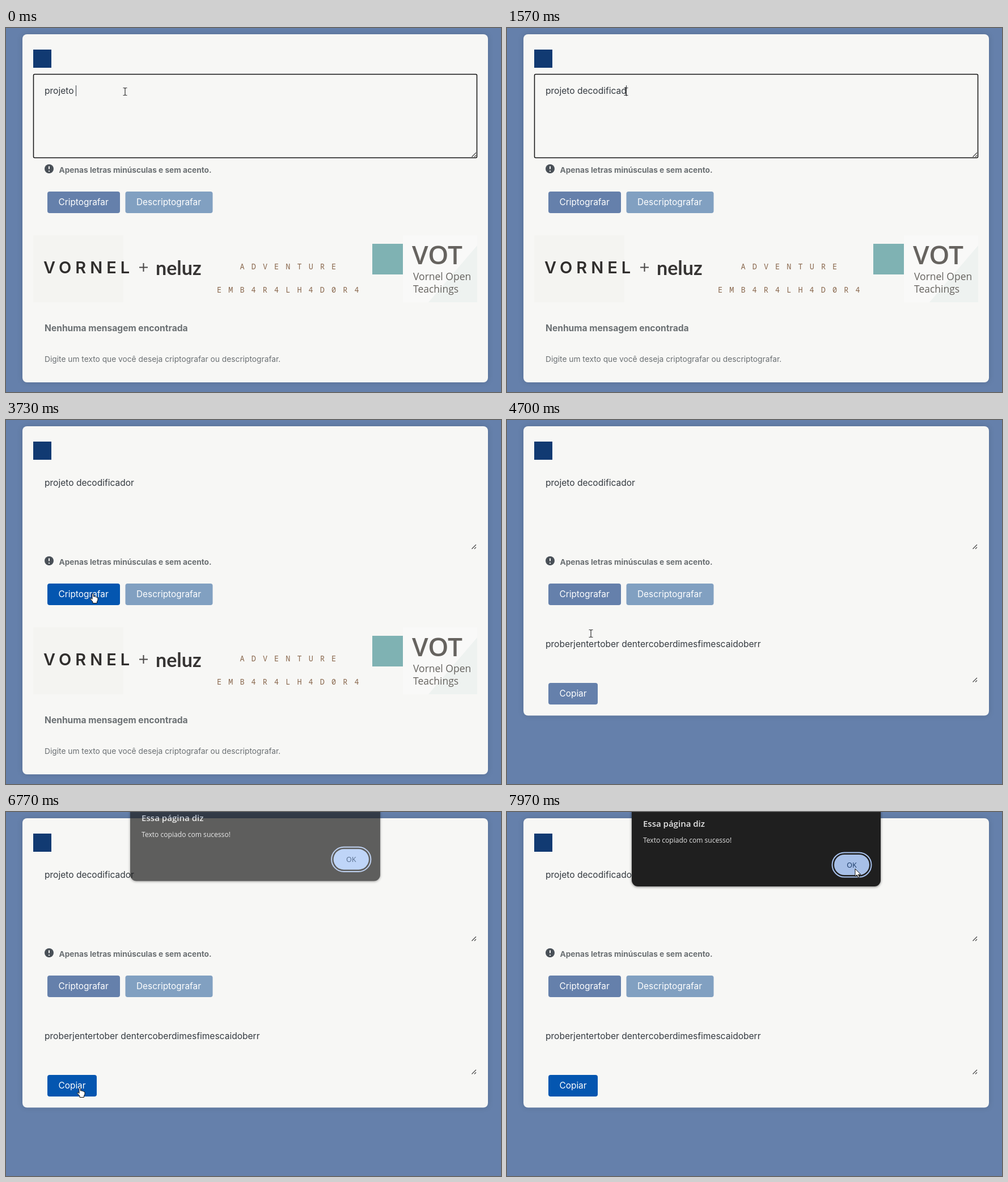
These frames come from a looping animation (873x641 px, 8 s). An HTML page:

```html
<!DOCTYPE html>
<html lang="pt-BR">
<head>
<meta charset="utf-8">
<style>
  html, body { margin: 0; width: 100%; height: 100%; overflow: hidden; background: #6580ab; }
  svg { display: block; width: 873px; height: 641px; font-family: Inter, sans-serif; }
  text { white-space: pre; }
  .field { font-size: 15.55px; fill: #343a40; }
  .strong { font-weight: 700; fill: #6b7073; }
  .button text { font-size: 15.4px; fill: #fff; }
  .code { font: 13.5px "Noto Sans Mono", monospace; letter-spacing: 12.1px; fill: #8b6a50; }
  .program { font-family: "Open Sans", sans-serif; fill: #66635f; }
  .dialog { font-family: "Open Sans", sans-serif; }
  .grip { stroke: #4b4b4b; stroke-width: 1.2; fill: none; }
  #card { filter: drop-shadow(0 0 5px rgba(0, 0, 0, .14)); }
  #dialog { filter: drop-shadow(0 1px 2px rgba(0, 0, 0, .5)); transform-origin: 440px 131px; }
</style>
</head>
<body>
<svg viewBox="0 0 873 641">
  <rect width="873" height="641" fill="#6580ab"/>
  <rect id="card" x="29" y="11" width="821" height="613" rx="8" fill="#f7f7f5"/>
  <rect x="48" y="38" width="32" height="32" fill="#113a72"/>

  <rect id="focus" x="48.5" y="81.5" width="782" height="147" rx="2" fill="none" stroke="#101010" stroke-width="1.5"/>
  <path class="grip" d="M821.5 227l7.5-7.5M826 227l3-3"/>
  <text id="input" class="field" x="68" y="116"></text>
  <rect id="caret" y="101" width="1" height="19" fill="#343a40"/>

  <circle cx="76" cy="248" r="8" fill="#495057"/>
  <path d="M76 243.5v5M76 251.2v1.8" stroke="#f8f8f8" stroke-width="2"/>
  <text class="strong" x="93.5" y="255" font-size="13.7">Apenas letras minúsculas e sem acento.</text>

  <g class="button">
    <rect id="encrypt" x="73" y="288" width="128" height="38" rx="4"/>
    <text x="92.5" y="312">Criptografar</text>
    <rect x="210.5" y="288" width="154" height="38" rx="4" fill="#81a0c1"/>
    <text x="230" y="312">Descriptografar</text>
  </g>

  <g id="empty">
    <rect x="48" y="365" width="159" height="118" fill="#f4f4f1"/>
    <rect x="700" y="365" width="131" height="118" fill="#f9f9f8"/>
    <path d="M745 483L831 383V483Z" fill="#eef2f0"/>
    <text x="66" y="432" font-size="29" font-weight="600" letter-spacing="7" fill="#302e2d">VORNEL</text>
    <path d="M235 421.5h15M242.5 414v15" stroke="#494746" stroke-width="2"/>
    <text x="264" y="435" font-size="34" font-weight="700" fill="#363433" font-family="Lato, sans-serif">neluz</text>
    <text class="code" x="412.5" y="425">ADVENTURE</text>
    <text class="code" x="372" y="466">EMB4R4LH4D0R4</text>
    <rect x="646" y="380" width="54" height="54" fill="#7fb2b3"/>
    <g class="program">
      <text x="716" y="416" font-size="46" font-weight="600">VOT</text>
      <text x="718" y="444" font-size="17.5">Vornel Open</text>
      <text x="718" y="466" font-size="17.5">Teachings</text>
    </g>
    <text class="strong" x="68" y="534" font-size="15.6">Nenhuma mensagem encontrada</text>
    <text x="68" y="588" font-size="13.75" fill="#6b7073">Digite um texto que você deseja criptografar ou descriptografar.</text>
  </g>

  <g id="result">
    <text class="field" x="68" y="400">proberjentertober dentercoberdimesfimescaidoberr</text>
    <path class="grip" d="M821.5 461.5l7.5-7.5M826 461.5l3-3"/>
    <g class="button">
      <rect id="copy" x="73" y="463" width="87" height="38" rx="4"/>
      <text x="92.5" y="487">Copiar</text>
    </g>
  </g>

  <g id="dialog" class="dialog">
    <rect x="220" y="-60" width="439" height="191" rx="11" fill="#1f1f1f"/>
    <text x="240" y="26" font-size="15" font-weight="600" fill="#e6e6e6">Essa página diz</text>
    <text x="240" y="54" font-size="12.05" fill="#e3e3e3">Texto copiado com sucesso!</text>
    <rect x="573.5" y="71.5" width="69" height="43" rx="21.5" fill="none" stroke="#a8c2ee" stroke-width="2"/>
    <rect id="ok" x="577" y="75" width="62" height="36" rx="18"/>
    <text x="608" y="97.5" font-size="12.5" text-anchor="middle" fill="#173765">OK</text>
  </g>

  <g id="pointer">
    <path id="beam" d="M-3.5-6.5H-1L0-5.5L1-6.5H3.5M0-5.5V5.5M-3.5 6.5H-1L0 5.5L1 6.5H3.5" fill="none" stroke="#333" stroke-width="1.2"/>
    <path id="hand" d="M-1 1.5Q0-.5 1.5 1.5V6Q3.5 5 4.3 6.5Q6 5.7 6.8 7.3Q9 6.7 9 9V12L7.5 15V17.5H0V15L-4 10.5Q-4.5 8.5-2.8 8.8L-1 10.5Z" fill="#fff" stroke="#111" stroke-linejoin="round"/>
    <path id="arrow" d="M0 0V13.5L3.2 10.7L5.4 15.5L7.5 14.5L5.4 10H9.8Z" fill="#fff" stroke="#111" stroke-linejoin="round"/>
  </g>
</svg>
<script>
const LOOP = 8000;
const MESSAGE = "projeto decodificador";
const TYPED_AT_START = 8, KEY_INTERVAL = 140;
const TYPING_END = (MESSAGE.length - TYPED_AT_START) * KEY_INTERVAL;
const MOUSE_DOWN = 3640, ENCRYPTED = 3810, DIALOG_OPEN = 6630, DIALOG_FADE = 200, LEAVE_COPY = 7050;

// Pointer stops: time, x, y
const STOPS = [
  [0, 210, 112], [2600, 210, 112], [3300, 153, 305], [4350, 153, 305],
  [4700, 148, 376], [5350, 130, 485], [LEAVE_COPY, 130, 485], [7750, 614, 100], [LOOP, 614, 100]
];

const el = id => document.getElementById(id);
const show = (id, visible) => el(id).setAttribute("visibility", visible ? "visible" : "hidden");
const set = (id, name, value) => el(id).setAttribute(name, value);
const smooth = p => p * p * (3 - 2 * p);
const inside = ([x, y], left, top, right, bottom) => x >= left && x < right && y >= top && y < bottom;

function pointerAt(t) {
  const i = STOPS.findIndex(stop => stop[0] > t);
  const [t0, x0, y0] = STOPS[i - 1], [t1, x1, y1] = STOPS[i];
  const p = smooth((t - t0) / (t1 - t0));
  return [x0 + (x1 - x0) * p, y0 + (y1 - y0) * p];
}

function draw(t) {
  const encrypted = t >= ENCRYPTED, dialog = t >= DIALOG_OPEN;
  const pos = pointerAt(t);

  const count = TYPED_AT_START + Math.floor(t / KEY_INTERVAL);
  el("input").textContent = MESSAGE.slice(0, count);
  set("caret", "x", Math.round(67.5 + el("input").getComputedTextLength()));
  const focused = t < MOUSE_DOWN;
  show("focus", focused);
  show("caret", focused && (t < TYPING_END || (t - TYPING_END) % 1000 < 500));

  set("card", "height", encrypted ? 509.5 : 613);
  show("empty", !encrypted);
  show("result", encrypted);

  const overEncrypt = !dialog && inside(pos, 73, 288, 201, 326);
  const overCopy = dialog || encrypted && inside(pos, 73, 463, 160, 501);
  const buttonColor = hover => hover ? "#0456b0" : "#6580ab";
  set("encrypt", "fill", buttonColor(overEncrypt));
  set("copy", "fill", buttonColor(overCopy));

  const p = Math.max(0, Math.min(1, (t - DIALOG_OPEN) / DIALOG_FADE));
  show("dialog", dialog);
  el("dialog").style.opacity = p;
  el("dialog").style.transform = `translateY(${-32 * (1 - p)}px) scale(${1 + .015 * (1 - p)})`;
  set("ok", "fill", inside(pos, 577, 75, 640, 111) ? "#a7bfe7" : "#a8c7fa");

  const overField = inside(pos, 48, 81, 831, 229) || encrypted && inside(pos, 48, 361, 831, 463);
  const overButton = overEncrypt || overCopy || inside(pos, 210, 288, 365, 326);
  const kind = t >= LEAVE_COPY ? "arrow" : overField ? "beam" : overButton ? "hand" : "arrow";
  for (const id of ["beam", "hand", "arrow"]) show(id, id === kind);
  set("pointer", "transform", `translate(${pos.map(Math.round)})`);
}

const start = performance.now();
function tick() {
  draw((performance.now() - start) % LOOP);
  requestAnimationFrame(tick);
}
tick();
</script>
</body>
</html>
```
